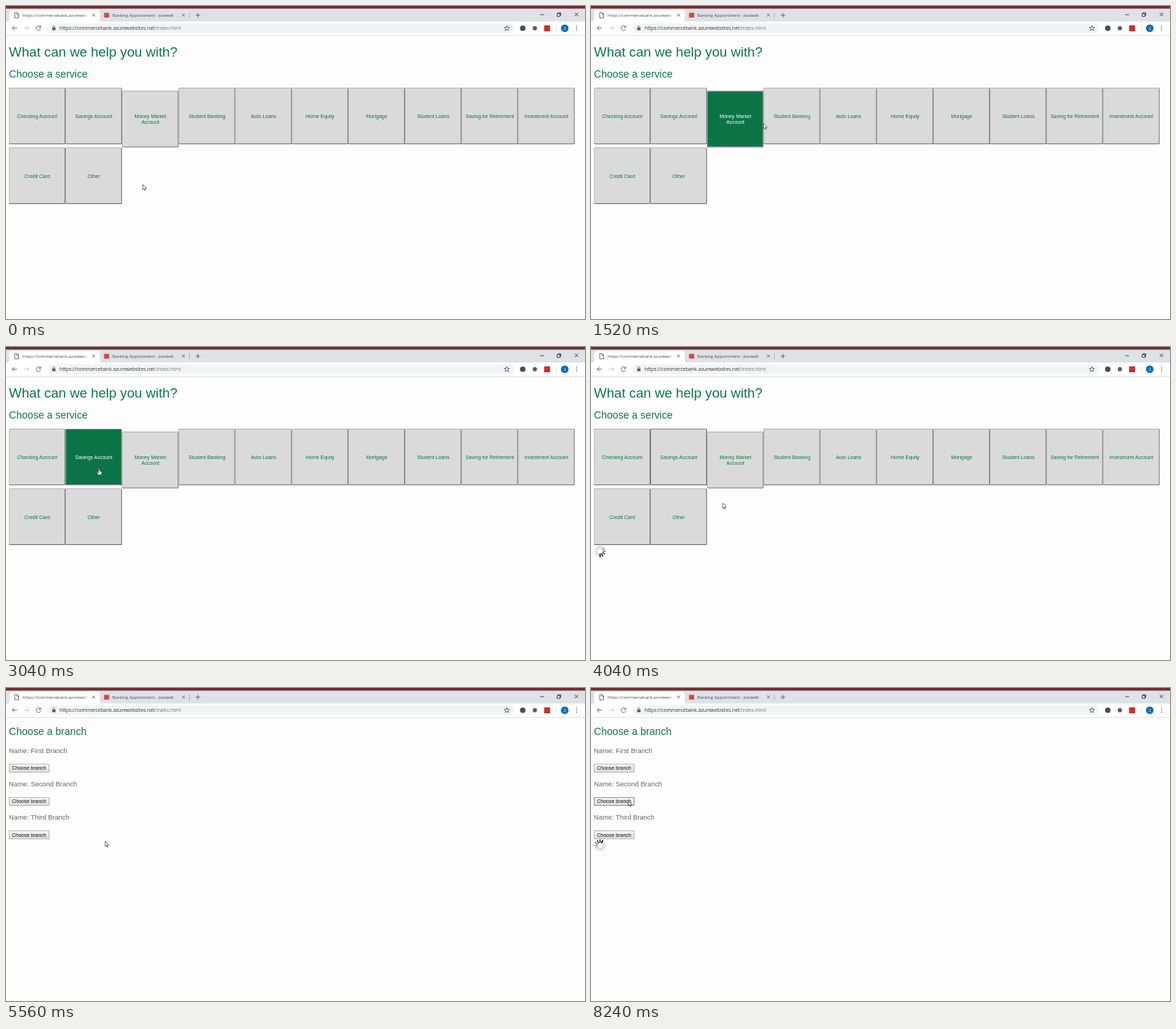
An HTML page that plays this animation: 800 by 433 pixels, repeating every 8280 ms.

```html
<!DOCTYPE html>
<html lang="en">
<head>
<meta charset="utf-8">
<title>Service chooser</title>
<style>
  html, body { margin: 0; width: 100%; height: 100%; overflow: hidden; background: #fefdfe; }
  svg { display: block; width: 800px; height: 433px; }
  text { font-family: "Liberation Sans", Arial, sans-serif; white-space: pre; }
  .ui { font-family: "Open Sans", "Noto Sans", sans-serif; }
  .card text { font-size: 6.95px; fill: #0b7748; text-anchor: middle; }
  .card .edge { fill: #717171; }
  .card .rim { fill: #bcbbbc; }
  .card .face { fill: #dbdadb; }
  .card.focus .rim { fill: #777; }
  .card.hover .rim { fill: #a9b5ae; }
  .card.hover .face { fill: #0a7447; }
  .card.hover text { fill: #fff; }
  .line { fill: none; stroke: #5a5d61; stroke-width: .9; }
</style>
</head>
<body>
<svg id="stage" viewBox="0 0 800 433" xmlns="http://www.w3.org/2000/svg">
  <defs>
    <linearGradient id="fadeA" gradientUnits="userSpaceOnUse" x1="105" x2="114" y1="0" y2="0">
      <stop stop-color="#45494d"/><stop offset="1" stop-color="#45494d" stop-opacity="0"/>
    </linearGradient>
    <linearGradient id="fadeB" gradientUnits="userSpaceOnUse" x1="229" x2="238" y1="0" y2="0">
      <stop stop-color="#45494d"/><stop offset="1" stop-color="#45494d" stop-opacity="0"/>
    </linearGradient>
    <linearGradient id="btn" x2="0" y2="1">
      <stop stop-color="#f6f6f6"/><stop offset="1" stop-color="#dcdcdc"/>
    </linearGradient>
  </defs>

  <rect width="800" height="433" fill="#fefdfe"/>
  <g id="browser">
    <rect width="800" height="22" fill="#dee1e6"/>
    <rect width="800" height="3.6" fill="#6b2f32"/>
    <path d="M2 22Q4.500 21.500 4.500 18V9Q4.500 5.500 8 5.500H126Q129.500 5.500 129.500 9V18Q129.500 21.500 132 22Z" fill="#fff"/>
    <rect y="21.500" width="800" height="19" fill="#fff"/>
    <rect y="40.400" width="800" height=".8" fill="#d5d6d8"/>
    <path class="line" d="M12 9.200H15.500L17.500 11.200V16.300H12ZM15.300 9.200V11.400H17.500"/>
    <text class="ui" x="23" y="15" font-size="5.800" fill="url(#fadeA)">https://commercebank.azurewebsites</text>
    <path class="line" d="M119 10.500l4 4m0-4l-4 4M243.200 10.500l4 4m0-4l-4 4"/>
    <rect x="135.500" y="9.500" width="7" height="6.500" fill="#d9453a"/>
    <text class="ui" x="147" y="15" font-size="5.800" fill="url(#fadeB)">Banking Appointment - jtarwelk</text>
    <path d="M253.500 8.500V17" stroke="#9a9da1" stroke-width=".7"/>
    <path class="line" d="M262 12.700h6.400M265.200 9.500v6.400"/>
    <path d="M738 12h5.500M761.500 10.600h3.800v3.800h-3.800ZM762.700 10.500v-1.200h3.800v3.800h-1.200M785.800 9.200l4.800 4.800m0-4.800l-4.800 4.800" fill="none" stroke="#222" stroke-width=".8"/>

    <rect x="57" y="24" width="645" height="13.600" rx="6.800" fill="#f1f3f4"/>
    <path class="line" d="M15 30.700H8.600M11.600 27.600L8.500 30.700L11.600 33.800"/>
    <path class="line" d="M25 30.700h6.400M28.400 27.600l3.100 3.100l-3.100 3.100" style="stroke:#c2c4c7"/>
    <path class="line" d="M47.400 28.800A3.200 3.200 0 1 0 48 31.600M48 27v2.600h-2.600"/>
    <path d="M63.800 29.800h4.600v3.800h-4.600Z" fill="#5a5d61"/>
    <path class="line" d="M64.800 30v-1.300a1.300 1.300 0 0 1 2.600 0V30" style="stroke-width:.7"/>
    <text class="ui" x="74" y="33" font-size="6.800" fill="#34373b">https://commercebank.azurewebsites.net<tspan fill="#777b80">/index.html</tspan></text>
    <path id="star" class="line"/>
    <circle cx="714" cy="30.800" r="3.800" fill="#4a4c50"/>
    <circle cx="730.700" cy="30.800" r="3" fill="#5c5e62"/>
    <rect x="743.500" y="26.700" width="8.300" height="8.300" fill="#c8302d"/>
    <path d="M760.500 26.500v9" stroke="#d3d5d8" stroke-width=".7"/>
    <circle cx="772" cy="30.800" r="5.300" fill="#0f6fba"/>
    <text x="772" y="32.800" font-size="5.600" fill="#fff" text-anchor="middle">J</text>
    <path d="M788.400 27.900v.01M788.400 30.700v.01M788.400 33.500v.01" stroke="#55585c" stroke-width="1.500" stroke-linecap="round"/>
  </g>
  <g id="services"></g>
  <g id="branches"></g>
  <g id="spinner"></g>
  <g id="pointer">
    <path id="arrow" d="M0 0V7.200L1.700 5.700L2.800 8.200L3.900 7.700L2.800 5.300H5Z" fill="#fff" stroke="#333" stroke-width=".7" stroke-linejoin="round"/>
    <path id="hand" d="M-.8 .8Q0 -.4 .8 .8V3.600L3.300 4.200Q4.200 4.500 4 5.600L3.300 9H-.9L-3 5.900Q-2.600 4.800 -1.600 5.500L-.8 6.200Z" fill="#fff" stroke="#333" stroke-width=".7" stroke-linejoin="round"/>
  </g>
</svg>

<script>
const LOOP = 8280, TICK = 40, LAG = 80;
const SERVICE_CLICK = 3360, SERVICE_SPIN = 3440, PAGE_SWITCH = 4360;
const BRANCH_CLICK = 6800, BRANCH_SPIN = 6880;
const SPIN_STEP = 60, SPOKES = 12;
const STALLS = [[3600, 3760], [7040, 7200], [7560, 7720]];

const LABELS = ["Checking Account", "Savings Account", "Money Market|Account", "Student Banking",
  "Auto Loans", "Home Equity", "Mortgage", "Student Loans", "Saving for Retirement",
  "Investment Account", "Credit Card", "Other"];

// time, x, y of the pointer tip
const PATH = [
  [0, 189, 247], [240, 150, 245], [480, 115, 240], [800, 119, 215], [880, 123.500, 168],
  [1080, 140, 150], [1240, 190, 165], [1440, 215, 165], [1600, 262, 160], [1680, 290, 165],
  [1840, 320, 165], [1960, 355, 172], [2080, 349.500, 177], [2200, 335, 184], [2320, 270, 188],
  [2440, 190, 200], [2520, 150, 212], [2600, 130, 220], [2760, 122, 205], [2880, 124, 180],
  [3040, 128.500, 168], [3760, 128.500, 168], [4040, 182, 216], [4320, 186, 245], [5520, 186, 245],
  [5560, 137, 212], [5700, 70, 130], [5840, 30, 62], [6000, 12, 110], [6160, 30, 165],
  [6360, 40, 170], [6560, 50, 158], [6640, 51.500, 156]
];

const $ = id => document.getElementById(id);

function add(parent, tag, attrs, text) {
  const node = document.createElementNS("http://www.w3.org/2000/svg", tag);
  for (const key in attrs) node.setAttribute(key, attrs[key]);
  if (text) node.textContent = text;
  return parent.appendChild(node);
}

function box(parent, x, y, width, height, rx, cls) {
  return add(parent, "rect", { x, y, width, height, rx, class: cls });
}

function heading(parent, y, size, text) {
  add(parent, "text", { x: 4, y, "font-size": size, fill: "#0b7748" }, text);
}

const cards = LABELS.map((label, i) => {
  const x = 4 + (i % 10) * 78.170;
  const y = i > 9 ? 195.800 : i === 2 ? 117.500 : 113.200;
  const el = add($("services"), "g", { class: "card" });
  box(el, x, y, 78.100, 78.100, 1.500, "edge");
  box(el, x, y, 77.100, 77.100, 1.200, "rim");
  box(el, x + .8, y + .8, 76, 76, .6, "face");
  const lines = label.split("|");
  lines.forEach((line, n) =>
    add(el, "text", { x: x + 39.100, y: y + 41.700 + (n - (lines.length - 1) / 2) * 8 }, line));
  return { el, x, y };
});
heading($("services"), 70, 18.720, "What can we help you with?");
heading($("services"), 98.800, 14.100, "Choose a service");

heading($("branches"), 65.200, 14.100, "Choose a branch");
const buttons = ["First", "Second", "Third"].map((name, i) => {
  const y = 105.200 + i * 46.200;
  add($("branches"), "text", { x: 4, y: y - 15.400, "font-size": 9.400, fill: "#666" }, `Name: ${name} Branch`);
  const rect = add($("branches"), "rect", { x: 4.400, y, width: 55.200, height: 11.200,
    fill: "url(#btn)", stroke: "#a8a8a8", "stroke-width": .8 });
  add($("branches"), "text", { x: 32, y: y + 8, "font-size": 7, fill: "#111", "text-anchor": "middle" }, "Choose branch");
  return rect;
});

const spokes = Array.from({ length: SPOKES }, (_, i) =>
  add($("spinner"), "path", { d: "M0 -4.200V-7.400", transform: `rotate(${i * 360 / SPOKES})`,
    "stroke-width": 1.700, "stroke-linecap": "round" }));

$("star").setAttribute("d", "M" + Array.from({ length: 10 }, (_, i) => {
  const r = i % 2 ? 1.600 : 3.800, a = i * Math.PI / 5;
  return `${(692 + r * Math.sin(a)).toFixed(2)} ${(30.900 - r * Math.cos(a)).toFixed(2)}`;
}).join("L") + "Z");

function pointerAt(t) {
  const next = PATH.findIndex(p => p[0] > t);
  if (next < 0) return PATH[PATH.length - 1].slice(1);
  const [t0, x0, y0] = PATH[Math.max(next - 1, 0)], [t1, x1, y1] = PATH[next];
  const k = Math.max(0, (t - t0) / (t1 - t0));
  return [x0 + (x1 - x0) * k, y0 + (y1 - y0) * k];
}

const cardAt = ([px, py]) =>
  cards.find(c => px >= c.x && px < c.x + 78 && py >= c.y && py < c.y + 78);

function activeTime(t) {
  return STALLS.reduce((sum, [a, b]) => sum - Math.min(Math.max(t - a, 0), b - a), t);
}

function drawSpinner(t, onServices) {
  const shown = onServices ? t >= SERVICE_SPIN : t >= BRANCH_SPIN;
  $("spinner").style.display = shown ? "" : "none";
  if (!shown) return;
  $("spinner").setAttribute("transform", `translate(12.500 ${onServices ? 282.500 : 217.700})`);
  const head = Math.floor(activeTime(t) / SPIN_STEP) + (onServices ? 2 : 4);
  spokes.forEach((spoke, i) => {
    const age = ((head - i) % SPOKES + SPOKES) % SPOKES;
    const tone = Math.min(205, 10 + age * 36);
    spoke.setAttribute("stroke", `rgb(${tone},${tone},${tone})`);
  });
}

function draw(t) {
  const onServices = t < PAGE_SWITCH;
  const tip = pointerAt(t);
  $("services").style.display = onServices ? "" : "none";
  $("branches").style.display = onServices ? "none" : "";

  // highlighting trails the pointer slightly
  const lit = cardAt(pointerAt(t - LAG));
  cards.forEach((card, i) => {
    card.el.classList.toggle("hover", card === lit);
    card.el.classList.toggle("focus", i === 1 && t >= SERVICE_CLICK);
  });
  buttons[1].setAttribute("stroke", t >= BRANCH_CLICK ? "#777" : "#a8a8a8");

  const overCard = onServices && cardAt(tip);
  $("hand").style.display = overCard ? "" : "none";
  $("arrow").style.display = overCard ? "none" : "";
  $("pointer").setAttribute("transform", `translate(${tip[0]} ${tip[1]})`);
  drawSpinner(t, onServices);
}

const start = performance.now();
function frame() {
  const t = (performance.now() - start) % LOOP;
  draw(Math.floor(t / TICK) * TICK);
  requestAnimationFrame(frame);
}
frame();
</script>
</body>
</html>
```
